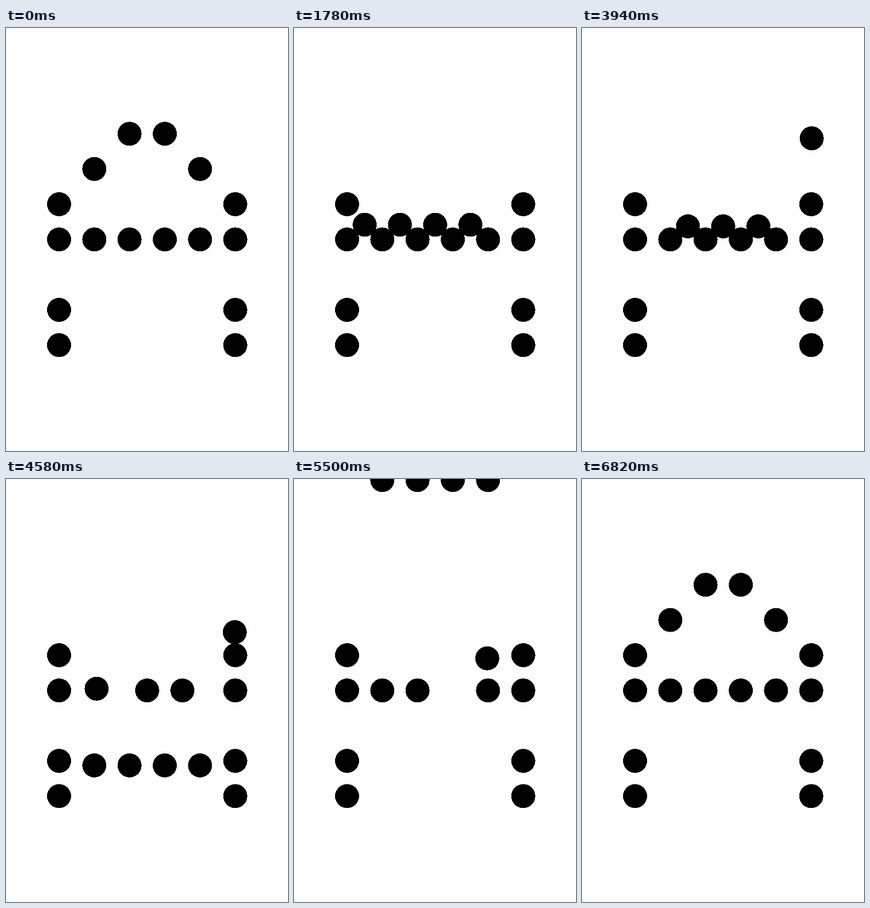
Write an HTML page that moves like this. It is 611 px wide and 917 px high and loops after 7120 ms.

```html
<!DOCTYPE html>
<html lang="en">
<head>
<meta charset="utf-8">
<title>Rolling dots</title>
<style>
  html, body { margin: 0; width: 100%; height: 100%; overflow: hidden; background: #fefefe; }
  svg { display: block; width: 100%; height: 100%; shape-rendering: crispEdges; }
</style>
</head>
<body>
<svg id="stage" viewBox="0 0 611 917"></svg>
<script>
const LOOP = 7120, STEP = 40, DELAY = 580, LAST = 156;
const GRID = 76.35, RADIUS = 26, CONTACT = 50;
const stage = document.getElementById('stage');

const colX = c => 115 + GRID * c;
const rowY = r => 229.3 + GRID * r;
const cell = (c, r) => [colX(c), rowY(r)];
const BAR = 3;                                     // grid row of the crossbar
const archRow = c => (c === 1 || c === 4 ? 1 : 0);

// Moves run from step n0 to n1; at(p) gives the point at progress p.
const mix = (a, b, p) => a + (b - a) * p;
const linear = p => p;

const line = (n0, n1, a, b, easeX = linear) => ({
  n0, n1, at: p => [mix(a[0], b[0], easeX(p)), mix(a[1], b[1], p)]
});

// Roll to the left over a dot, starting from its top.
const roll = (n0, n1, [x, y], angle) => ({
  n0, n1, at: p => [x - CONTACT * Math.sin(angle * p), y - CONTACT * Math.cos(angle * p)]
});

const hop = (n0, n1, a, b, height) => ({
  n0, n1, at: p => [mix(a[0], b[0], p), mix(a[1], b[1], p) - 4 * height * p * (1 - p)]
});

const gap = (c, y) => [colX(c - 0.5), y];

// An arch dot drops onto the bar and rolls into the gap on its left.
function drop(c) {
  const speed = 8.94, top = cell(c, archRow(c));
  const contact = [top[0], rowY(BAR) - CONTACT];
  return [
    line(archRow(c) * GRID / speed, 20, top, contact),
    roll(20, 30, cell(c, BAR), 0.87)
  ];
}

// The leftmost dot leaves on the left, returns on the right and rolls back into the bar.
function travel() {
  const corner = cell(5, 2), perch = [corner[0] - 1, corner[1] - CONTACT];
  const turn = 0.9, ledge = [376.5, 430];
  const off = roll(104, 112, corner, turn);
  return [
    ...drop(1),
    line(30, 60, gap(1, 426.5), [-27, 873], p => p ** 0.3),
    line(63, 92.4, [637, 7], perch, p => 1 - (1 - p) ** 3.4),
    off,
    line(112, 135, off.at(1), ledge),
    line(135, 147, ledge, cell(3, BAR))
  ];
}

// The others sink a little, land in the bar once it has gone, then settle in a column.
function settle(c) {
  const low = gap(c, 430), target = c === 4 ? 4 : c - 1;
  const sink = line(30, 60, gap(c, 426.5), low);
  if (c === 2) return [...drop(c), sink, line(90, 101.5, low, cell(target, BAR))];
  const landing = gap(c, rowY(BAR));
  return [
    ...drop(c), sink,
    line(90, 100, low, landing),
    hop(102, 115.6, landing, cell(target, BAR), 7)
  ];
}

// A bar dot falls out below and comes back from above to form the arch.
function fall(c) {
  const top = [colX(c), -28], end = cell(c, archRow(c)), speed = 10.11;
  return [
    line(90, 120, cell(c, BAR), [colX(c), 946]),
    line(120, 120 + (end[1] - top[1]) / speed, top, end)
  ];
}

function pose(moves, n) {
  const move = moves.findLast(m => m.n0 <= n) || moves[0];
  const p = (n - move.n0) / (move.n1 - move.n0);
  return move.at(Math.min(1, Math.max(0, p)));
}

function addDot() {
  const dot = document.createElementNS('http://www.w3.org/2000/svg', 'circle');
  dot.setAttribute('r', RADIUS);
  return stage.appendChild(dot);
}

function place(dot, [x, y]) {
  dot.setAttribute('cx', x);
  dot.setAttribute('cy', y);
}

for (const c of [0, 5])
  for (const r of [2, 3, 5, 6]) place(addDot(), cell(c, r));

const tracks = [travel(), ...[2, 3, 4].map(settle), ...[1, 2, 3, 4].map(fall)];
const dots = tracks.map(addDot);
const start = performance.now();

function draw() {
  const time = (performance.now() - start) % LOOP;
  const n = Math.min(LAST, Math.max(0, Math.floor((time - DELAY) / STEP)));
  dots.forEach((dot, i) => place(dot, pose(tracks[i], n)));
  requestAnimationFrame(draw);
}
draw();
</script>
</body>
</html>
```
